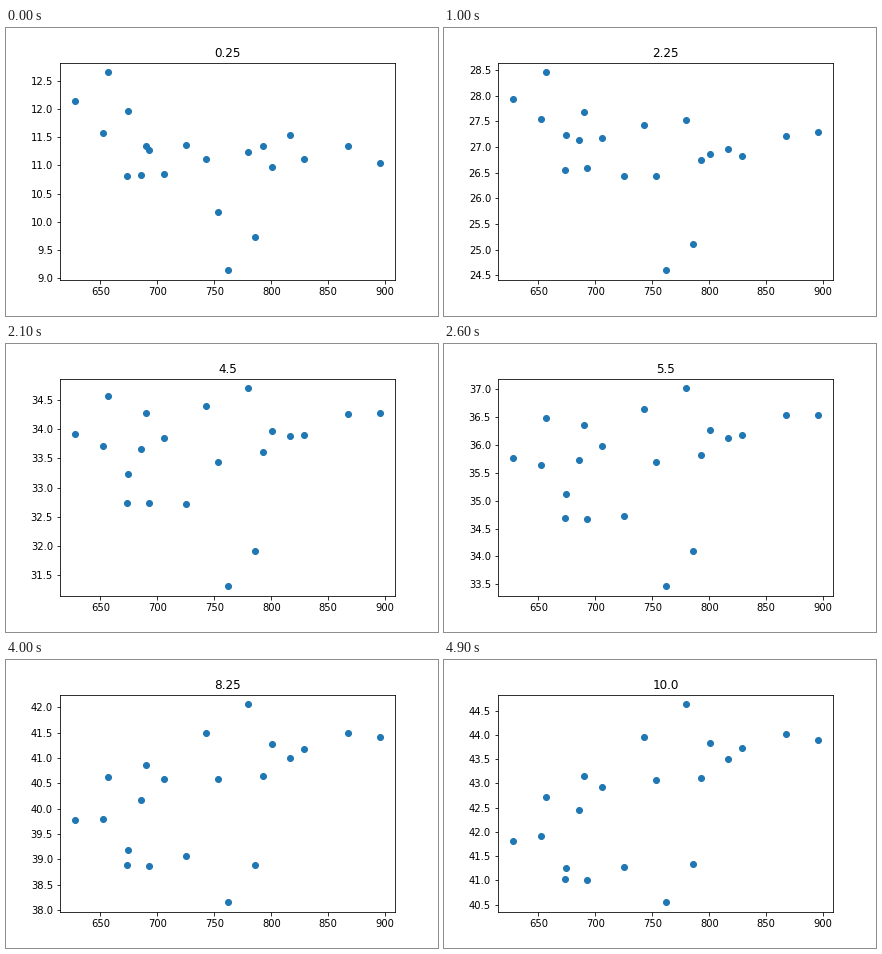
These frames come from a looping animation (432 by 288 pixels, 5 s). A matplotlib script:

```python
import numpy as np
import matplotlib.pyplot as plt
from matplotlib.animation import FuncAnimation

SLOTS = 50
SLOT_MS = 100
FIRST, LAST = 0.25, 10.0

# One dot per row: x, height at the start, height at the end.
DOTS = np.array([
    (628, 12.14, 41.81), (652, 11.57, 41.91), (657, 12.65, 42.72),
    (673, 10.81, 41.02), (674, 11.96, 41.25), (686, 10.83, 42.45),
    (690, 11.34, 43.15), (693, 11.27, 41.00), (706, 10.85, 42.92),
    (725, 11.36, 41.27), (743, 11.11, 43.96), (753, 10.17, 43.07),
    (762, 9.14, 40.55), (780, 11.24, 44.63), (786, 9.73, 41.33),
    (793, 11.34, 43.11), (801, 10.97, 43.83), (816, 11.54, 43.50),
    (829, 11.11, 43.73), (867, 11.34, 44.02), (895, 11.04, 43.90),
])
X, START, END = DOTS.T

# How far each dot bows off its straight path: most on the left.
BOW = np.polyval([0.62, 0.64, -1.19, 0.31], (X - 760) / 135)


def progress(value):
    """0 to 1 over the loop; heights grow with the fourth root."""
    u, a, b = (v ** 0.25 for v in (value, FIRST, LAST))
    return (u - a) / (b - a)


def heights(value):
    w = progress(value)
    return START + (END - START) * w + BOW * np.sin(np.pi * w ** 0.75)


def padded(v, margin=0.05):
    pad = margin * np.ptp(v)
    return v.min() - pad, v.max() + pad


fig, ax = plt.subplots(figsize=(6, 4), dpi=72)
fig.subplots_adjust(left=0.125, right=0.9, bottom=0.125, top=0.88)
dots = ax.scatter(X, START)
ax.set_xlim(padded(X))


def draw(slot):
    # Every fifth step is held for two slots.
    value = (1 + slot - (slot + 3) // 5) / 4
    y = heights(value)
    dots.set_offsets(np.column_stack([X, y]))
    ax.set_ylim(padded(y))
    ax.set_title(str(value))
    return [dots]


anim = FuncAnimation(fig, draw, frames=SLOTS, interval=SLOT_MS,
                     repeat=True, repeat_delay=0, blit=False)
plt.show()
```
